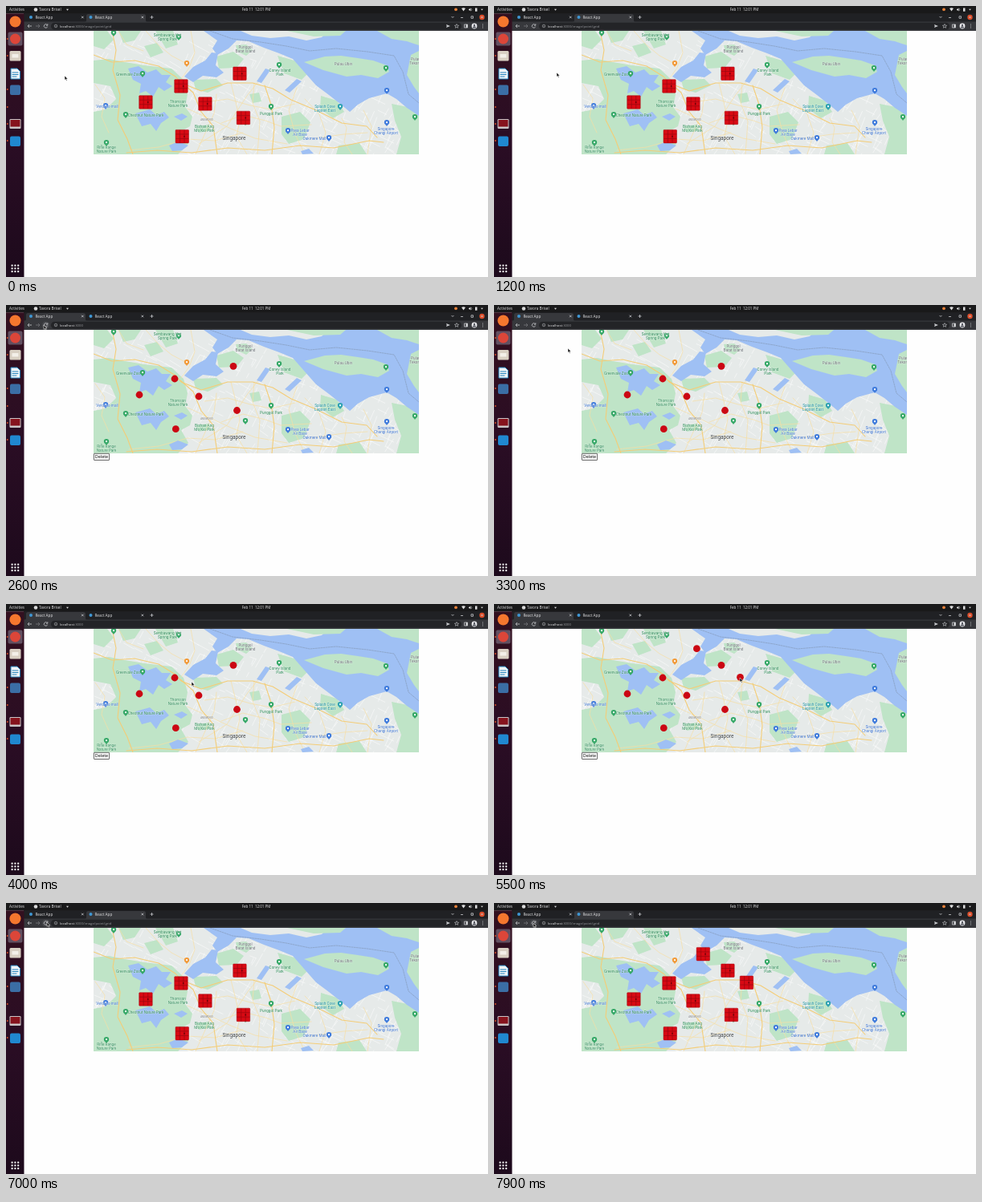
Write an HTML page that moves like this. It is 600x338 px and loops after 8000 ms.

```html
<!DOCTYPE html>
<html lang="en">
<head>
<meta charset="utf-8">
<title>Map points</title>
<style>
  html, body { margin: 0; width: 100%; height: 100%; overflow: hidden; background: #fefefe; }
  svg { display: block; width: 100%; height: 100%; }
  text { font-family: "Open Sans", "Noto Sans", sans-serif; font-size: 4.65px; fill: #e4e4e6; white-space: pre; }
  .mid { text-anchor: middle; }
  #labels text { font-family: Roboto, sans-serif; font-size: 4.7px; text-anchor: middle;
    paint-order: stroke; stroke: #fff; stroke-opacity: .5; stroke-width: .7px; }
  #labels .tiny { font-size: 2.7px; }
  #labels .city { font-size: 6.5px; }
  .line { fill: none; stroke-linecap: round; stroke-linejoin: round; }
  .icon { fill: none; stroke: #c8cacd; stroke-width: .8; }
</style>
</head>
<body>
<svg viewBox="0 0 600 338" preserveAspectRatio="none">
  <defs>
    <clipPath id="frame"><rect x="109" y="31" width="405" height="154"/></clipPath>
    <linearGradient id="dock" x2="0" y2="1">
      <stop stop-color="#33101f"/><stop offset=".5" stop-color="#2a0d24"/><stop offset="1" stop-color="#1d0a1c"/>
    </linearGradient>
  </defs>
  <rect width="600" height="338" fill="#fefefe"/>

  <g clip-path="url(#frame)">
    <rect x="109" y="31" width="405" height="154" fill="#e6eae9"/>
    <g id="streets" class="line" stroke="#fbfbfb" stroke-width=".6"></g>
    <g fill="#bfe4c7">
      <path d="M109 68L128 66 148 70 172 74 206 78 221 92 226 110 223 126 232 138 229 150 218 156 227 172 214 185H109V132L124 129 137 116 130 100 109 96Z"/>
      <path d="M109 31H126L134 42 122 54 109 50ZM140 31H168L160 43 146 46ZM172 50L188 46 196 58 180 64ZM186 31H208L214 48 199 53Z"/>
      <path d="M233 92L262 91 270 99 251 108 236 104ZM262 63L283 57 296 66 287 77 265 78ZM338 62L359 68 376 84 368 92 346 84ZM303 110L315 108 318 119 307 121ZM343 138L366 132 379 145 371 166 352 172 343 160Z"/>
      <path d="M236 150L252 148 256 155 240 158ZM392 112L412 118 421 132 407 140 391 128ZM480 122L500 126 514 136V185H486L492 163 484 143ZM414 174L440 171 449 185H411Z"/>
    </g>
    <path class="line" stroke="#f6dfa4" stroke-width=".7" d="M174 31L189 48 206 62 225 72M230 31L235 58 228 77 218 91M247 120L276 116 304 124 330 129 360 122M268 146L295 136 323 143 342 150 380 148M226 128L252 140 280 153 310 165 350 172M280 96L286 120 291 142 287 163 300 185M309 96L307 121 316 144 313 185M372 116L390 135 398 158 390 185M418 140L424 152 421 170 431 185M111 98L123 115 119 138 128 158M153 180L190 176 226 166 260 168 295 158M445 130L455 150 450 185M240 172L275 150 300 112 325 80M362 102L352 130 360 160 372 185M262 110L259 134 236 185M140 31L150 48 171 56M380 166L420 160 450 158"/>
    <g class="line" stroke="#f4cd78" stroke-width="1.100">
      <path d="M109 61L132 70 160 68 190 75 211 88 218 96 243 106 276 96 307 96 332 103 355 117 386 130 418 146 449 150 462 164"/>
      <path d="M132 31L137 55 133 80 142 111 139 142 151 166 158 185M217 94L233 108 243 132 258 150 263 185"/>
      <path d="M150 183L188 180 231 183 276 177 322 180 366 174 408 177 452 168 470 170M322 99L330 123 334 151 331 185"/>
    </g>
    <g fill="#9fc0f4">
      <path d="M246 31L263 43 257 53 263 61 277 53 287 43 302 44 321 52 340 59 357 66 371 82 386 99 402 111 416 122 428 132 438 123 452 115 474 109 486 116 499 127 514 137V31Z"/>
      <path d="M222 88L233 76 248 68 256 58 264 59 261 74 271 83 262 89 245 87 233 95Z"/>
      <path d="M152 78L165 75 176 83 187 79 194 86 205 86 199 95 207 100 197 106 190 101 183 113 174 106 166 109 168 97 158 92Z"/>
      <path d="M161 134L179 129 187 136 197 132 203 139 193 146 187 156 180 147 169 150ZM209 138L219 134 226 138 218 143ZM203 174L214 169 227 174 219 180 207 181ZM367 181L377 178 383 184 369 185Z"/>
      <path d="M312 94L323 78 329 80 318 96ZM347 105L362 91 368 94 353 108Z"/>
    </g>
    <path fill="#e6eae9" d="M292 31H402L393 39 374 43 352 38 329 40 306 37Z"/>
    <path fill="#bfe4c7" d="M371 70L397 63 417 62 438 65 457 68 474 74 477 82 463 90 442 86 424 88 395 80ZM504 61L514 56V109L508 101 499 86ZM286 49L299 48 307 55 299 62 288 57ZM350 31H423L416 37 383 38ZM462 31H514V49L499 44 480 41Z"/>
    <path class="line" stroke="#8296b3" stroke-width=".6" stroke-dasharray="2 1.2" d="M254 31L282 41 317 45 349 50 378 56 411 53 450 57 483 62 494 82 501 110 514 121"/>
    <g id="pins"></g>
    <g id="labels"></g>
  </g>
  <g id="dots" fill="#cb0713"></g>
  <g id="tiles"></g>
  <g id="del">
    <rect x="109.400" y="185.300" width="19.200" height="8.200" rx=".6" fill="#f6f6f6" stroke="#444" stroke-width=".8"/>
    <text x="119" y="191.300" class="mid" style="font-size:5.4px;fill:#111">Delete</text>
  </g>

  <rect x="22" y="9" width="578" height="11" fill="#202124"/>
  <path id="tab" fill="#37383c" d="M23 20Q25 20 25 18V12.500Q25 10 27.500 10H96.500Q99 10 99 12.500V18Q99 20 101 20Z"/>
  <rect x="22" y="19.500" width="578" height="11.500" fill="#37383c"/>
  <rect x="56" y="20.800" width="511" height="8.800" rx="4.400" fill="#232427"/>
  <g id="chrome">
    <circle cx="31" cy="14" r="2" fill="#3f97d4"/><circle cx="105.500" cy="14" r="2" fill="#3f97d4"/>
    <text x="36.500" y="15.700">React App</text><text x="110.500" y="15.700">React App</text>
    <circle cx="592.500" cy="14" r="3.200" fill="#dd4f2c"/>
    <path class="icon" d="M94 12.700l2.600 2.600m0-2.600l-2.600 2.600M168.500 12.700l2.600 2.600m0-2.600l-2.600 2.600M179.500 14h4M181.500 12v4M554.500 13l1.500 1.500 1.500-1.500M566 14.500h3M579 12.800h2.500v2.500h-2.500zM591.500 13l2 2m0-2l-2 2"/>
    <path class="icon" d="M32 25h-5m2-2l-2 2 2 2"/>
    <path class="icon" style="stroke:#77787c" d="M37 25h5m-2-2l2 2-2 2"/>
    <circle id="hover" cx="49.500" cy="25" r="4.500" fill="#47484c"/>
    <path class="icon" d="M51.300 23.700a2.200 2.200 0 1 0 .3 2M51.800 22.300v1.900h-1.900"/>
    <circle class="icon" cx="62" cy="25" r="1.800" style="stroke-width:.5"/><path class="icon" style="stroke-width:.5" d="M62 24.700v1.400M62 23.800v.4"/>
    <text x="67" y="26.600" style="font-size:4.3px">localhost<tspan id="path" fill="#96989c"></tspan></text>
    <path fill="#c8cacd" d="M548 23l5 2-5 2 .7-2z"/>
    <path class="icon" style="stroke-width:.6" d="M561 22.500l.7 1.700 1.900.1-1.500 1.200.5 1.800-1.600-1-1.600 1 .5-1.800-1.500-1.200 1.900-.1z"/>
    <path class="icon" d="M570.500 23h4v4h-4z"/><path fill="#d5d6d8" d="M572.500 23h2v4h-2z"/>
    <circle cx="583" cy="25" r="3.400" fill="#e9e9ec"/><path fill="#555860" d="M580.800 27.500a2.200 2.200 0 0 1 4.400 0zM584.200 24a1.200 1.200 0 1 1-2.400 0 1.200 1.200 0 0 1 2.400 0"/>
    <path fill="none" stroke="#c8cacd" stroke-linecap="round" d="M593.500 23v0M593.500 25v0M593.500 27v0"/>
  </g>

  <rect width="600" height="9.200" fill="#19191a"/>
  <text x="4" y="6.200">Activities</text>
  <circle cx="37" cy="4.500" r="2.300" fill="#d8d8d8"/>
  <text x="41" y="6.200">Tavora Brisel</text>
  <path fill="#ddd" d="M75 3.800h3l-1.500 1.900z"/>
  <text x="311.500" y="6.200" class="mid" style="font-size:4.5px">Feb 11  12:01 PM</text>
  <circle cx="560" cy="4.300" r="1.900" fill="#e8823a"/>
  <path fill="#ddd" d="M567 3q2.500-1.500 5 0l-2.500 3.500zM576 3.700h1l1.500-1.300v4.200l-1.500-1.300h-1zM584 2.500h2.500v4.200h-2.500zM591 3.700h3l-1.500 1.900z"/>
  <path class="icon" style="stroke-width:.5" d="M579.300 3q1.200 1.500 0 3"/>

  <rect y="9.200" width="22.500" height="328.800" fill="url(#dock)"/>
  <rect x="2.500" y="32.500" width="18" height="17" rx="2" fill="#625061"/>
  <circle cx="11.500" cy="19.500" r="7" fill="#f5772e"/>
  <circle cx="11.500" cy="41" r="6.500" fill="#dc4639"/>
  <rect x="4.500" y="56" width="14" height="12.500" rx="1.500" fill="#d9d0c3"/><rect x="7.500" y="60" width="8" height="4.500" rx=".6" fill="#f3efe8"/>
  <path fill="#f1f5f8" stroke="#2484bd" d="M6 78h8l3.500 3.500v9.500H6z"/><path class="line" stroke="#2484bd" d="M8 83h7M8 85.500h7M8 88h5"/>
  <rect x="5" y="98.500" width="13" height="12.500" rx="2" fill="#3b6ea5"/>
  <rect x="4.500" y="141" width="14" height="12" rx="1.200" fill="#c9c5c7"/><rect x="5.500" y="142" width="12" height="8.500" fill="#86131d"/>
  <rect x="5" y="162.500" width="13" height="12.500" rx="2" fill="#2088d0"/>
  <g id="running" fill="#e0532a"></g>
  <g id="apps" fill="#eee"></g>

  <path id="cursor" fill="#111" stroke="#fff" stroke-width=".5" d="M0 0V5.300L1.300 4.200 2.200 6.200 3.100 5.800 2.200 3.900H3.900Z"/>
</svg>
<script>
const $ = id => document.getElementById(id);

function add(parent, tag, attrs, text) {
  const el = document.createElementNS('http://www.w3.org/2000/svg', tag);
  for (const k in attrs) el.setAttribute(k, attrs[k]);
  if (text) el.textContent = text;
  return $(parent).appendChild(el);
}

// Side streets: short, slightly tilted strokes
let seed = 7;
const rnd = () => (seed = seed * 16807 % 2147483647) / 2147483647;
let streets = '';
for (let i = 0; i < 420; i++) {
  const x = 109 + rnd() * 405, y = 31 + rnd() * 154;
  const a = (rnd() < .5 ? .35 : 1.9) + rnd() * .3, len = 6 + rnd() * 14;
  streets += `M${x} ${y}l${Math.cos(a) * len} ${Math.sin(a) * len}`;
}
add('streets', 'path', { d: streets });

const GREEN = '#2c8a57', BLUE = '#3d74cf', TEAL = '#178d9c', GREY = '#6c7076';

function pin(x, y, fill) {
  add('pins', 'path', { d: `M${x} ${y + 4}c-1-2-3.200-2.500-3.200-4.800a3.200 3.200 0 0 1 6.400 0c0 2.300-2.200 2.800-3.200 4.800Z`, fill });
  add('pins', 'circle', { cx: x, cy: y - .8, r: 1.1, fill: '#fff' });
}
[[134, 34], [215, 39], [340, 74], [473, 78], [170, 85], [330, 126], [149, 136], [125, 171], [298, 145], [509, 139]]
  .forEach(p => pin(...p, '#35a867'));
[[124, 125], [351, 156], [474, 146], [402, 165], [474, 106]].forEach(p => pin(...p, '#3f7bdc'));
pin(416, 126, '#2fa3b1');
pin(225, 72, '#f29a38');

function label(x, y, lines, fill, cls = '') {
  lines.split('|').forEach((s, i) =>
    add('labels', 'text', { x, y: y + i * 5.2, class: cls, style: `fill:${fill}` }, s));
}
label(201, 37.5, 'Sembawang Hot|Spring Park', GREEN);
label(298, 53, 'Punggol|Barat Island', GREY);
label(341, 82, 'Coney Island|Park', GREEN);
label(420, 74, 'Pulau Ubin', GREY);
label(152, 87, 'Greenvale Zoo', GREEN);
label(214, 121, 'Thomson|Nature Park', GREEN);
label(174, 137.5, 'Chestnut Nature Park', GREEN);
label(247, 152, 'Bishan-Ang|Mo Kio Park', GREEN);
label(330, 135.5, 'Punggol Park', GREEN);
label(125, 178, 'Rifle Range|Nature Park', GREEN);
label(126, 126.5, 'Verdano mall', BLUE);
label(366, 156.5, 'Paya Lebar|Air Base', BLUE);
label(384, 167, 'Oakmere Mall', BLUE);
label(397, 127, 'Splash Cove|Lagoon East', TEAL);
label(473, 154.5, 'Singapore|Changi Airport', BLUE);
label(510, 68, 'Pulau|Tekong', GREY);
label(250, 143, 'ANG MO KIO', GREY, 'tiny');
label(284, 166.5, 'Singapore', '#3c4043', 'city');

[41, 62, 104, 126, 147, 168].forEach(cy => add('running', 'circle', { cx: 1.8, cy, r: .9 }));
for (let i = 0; i < 9; i++)
  add('apps', 'rect', { x: 6.5 + i % 3 * 3.8, y: 322.5 + Math.floor(i / 3) * 3.8, width: 2.2, height: 2.2, rx: .7 });

// Points: x, y and, for the last two, the time they are placed
const points = [[166, 112], [210, 92], [283, 76.3], [240, 114], [287.5, 131.5], [211.3, 154.7],
  [252.4, 55.7, 4600], [306.5, 91.3, 5200]];
const dots = points.map(([cx, cy]) => add('dots', 'circle', { cx, cy, r: 4.4 }));
const tiles = points.map(([x, y]) => [
  add('tiles', 'rect', { x: x - .3, y: y - .3, width: 16.5, height: 16.5, rx: .8, fill: '#d80913', stroke: '#a50710', 'stroke-width': .5 }),
  add('tiles', 'path', { d: `M${x + 5.2} ${y}v16m5.500 0v-16M${x} ${y + 5.2}h16m0 5.500h-16`, fill: 'none', stroke: '#990810', 'stroke-width': .7 }),
  add('tiles', 'circle', { cx: x + 10.7, cy: y + 8, r: .9, fill: '#65040a' })
]);

// Cursor path: time, x, y
const moves = [[0, 73, 87], [1100, 73, 87], [1200, 78, 83], [1500, 84, 62], [2000, 73, 18], [2200, 69, 13], [2300, 67, 13],
  [2600, 47, 25], [2900, 48, 25], [3300, 92, 54], [3800, 214, 99], [4000, 231, 97], [4300, 252, 56], [4500, 252, 56],
  [4900, 301, 88], [5100, 306, 92], [5500, 306, 92], [5900, 300, 88], [6300, 205, 42], [6600, 132, 13], [6700, 128, 13],
  [7000, 51, 24], [7300, 49, 25], [8000, 49, 25]];

function cursorAt(t) {
  const i = moves.findIndex(m => m[0] > t), [t0, x0, y0] = moves[i - 1], [t1, x1, y1] = moves[i];
  const k = (t - t0) / (t1 - t0);
  return [x0 + (x1 - x0) * k, y0 + (y1 - y0) * k];
}

const show = (el, on) => el.setAttribute('visibility', on ? 'visible' : 'hidden');

function draw(elapsed) {
  const t = Math.floor(elapsed % 8000 / 100) * 100;
  const editing = t >= 2200 && t < 6700;
  const [x, y] = cursorAt(t);
  $('cursor').setAttribute('transform', `translate(${x} ${y})`);
  $('tab').setAttribute('transform', `translate(${editing ? 0 : 75} 0)`);
  $('path').textContent = editing ? ':3000' : ':3000/image/point/grid';
  show($('hover'), Math.hypot(x - 49.5, y - 25) < 5);
  show($('del'), editing);
  points.forEach(([, , placed = 0], i) => {
    show(dots[i], editing && t >= placed);
    tiles[i].forEach(el => show(el, !editing && (!placed || t >= 7400)));
  });
}

const start = performance.now();
function tick() {
  draw(performance.now() - start);
  requestAnimationFrame(tick);
}
tick();
</script>
</body>
</html>
```
